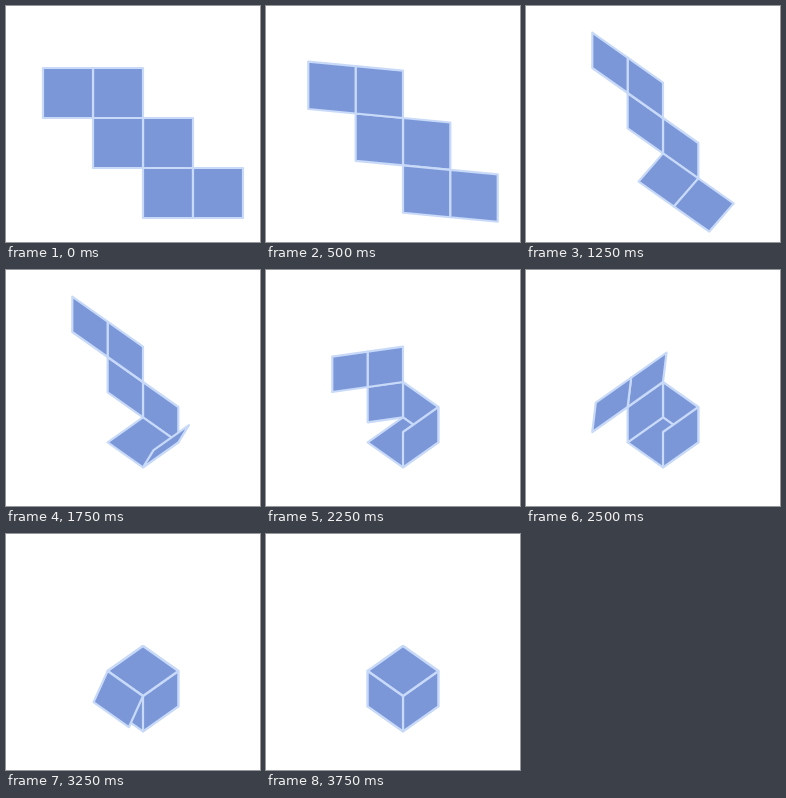
These frames come from a looping animation (254 by 236 pixels, 4.5 s). An HTML page with a canvas:

```html
<!DOCTYPE html>
<html lang="en">
<head>
<meta charset="utf-8">
<title>Net folding into a cube</title>
<style>
html, body { margin: 0; width: 100%; height: 100%; overflow: hidden; background: #fff; }
canvas { display: block; }
</style>
</head>
<body>
<canvas id="stage" width="254" height="236"></canvas>
<script>
const ctx = document.getElementById('stage').getContext('2d');
const LOOP = 4500, STEP = 250;
const S = 50, A = S * Math.SQRT1_2;

// Progress at each step: whole part = folds finished, fraction = current fold.
const progress = [0, 0, .18, .68, 1.18, 1.69, 2.2, 2.7, 3.1, 3.6, 4.1, 4.61, 5.1, 5.6, 5.95, 6];

const add = (...v) => v.reduce(([x, y], [a, b]) => [x + a, y + b]);
const neg = ([x, y]) => [-x, -y];
const mix = (p, q, t) => p.map((n, i) => n + (q[i] - n) * t);

function cell(p, u, v) {
  ctx.beginPath();
  for (const q of [p, add(p, u), add(p, u, v), add(p, v)]) ctx.lineTo(...q);
  ctx.closePath();
  ctx.fill();
  ctx.stroke();
}

function draw(p) {
  const fold = i => Math.min(1, Math.max(0, p - i));
  const origin = [137, 112];
  const right = mix([S, 0], [A, S / 2], fold(0));
  const down = mix([0, S], [0, A], fold(0));
  const floor = mix(down, [-A, S / 2], fold(1));
  const front = mix(right, [0, -A], fold(2));
  const left = mix(neg(right), [-A, S / 2], fold(3));
  const lid = mix(neg(down), right, fold(4));
  const flap = mix(left, [0, A], fold(5));
  const base = add(origin, down);

  ctx.fillStyle = '#fff';
  ctx.fillRect(0, 0, 254, 236);
  ctx.fillStyle = '#7b97d8';
  ctx.strokeStyle = '#c8daf8';
  ctx.lineWidth = 2.2;
  ctx.lineJoin = 'round';

  cell(origin, right, down);
  cell(base, right, floor);
  cell(origin, left, down);
  cell(add(base, right), front, floor);
  cell(origin, left, lid);
  cell(add(origin, left), flap, lid);
}

function tick(now) {
  const i = Math.floor(now % LOOP / STEP);
  draw(progress[Math.min(i, progress.length - 1)]);
  requestAnimationFrame(tick);
}
requestAnimationFrame(tick);
</script>
</body>
</html>
```
